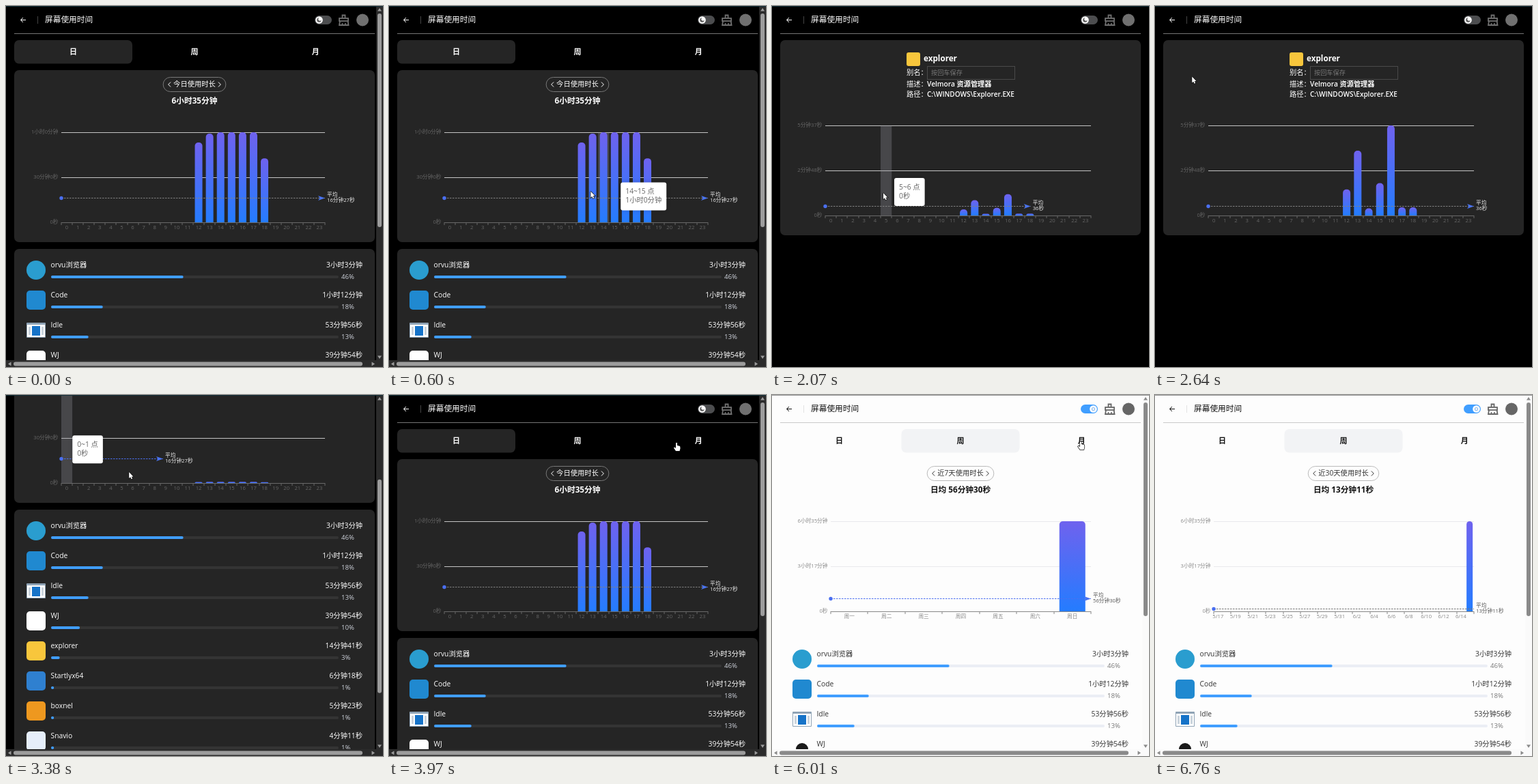
These frames come from a looping animation (552x529 px, 7010 ms). An HTML page with a canvas:

```html
<!DOCTYPE html>
<html lang="zh">
<head>
<meta charset="utf-8">
<title>屏幕使用时间</title>
<style>
html, body { margin: 0; width: 100%; height: 100%; overflow: hidden; background: #000; }
canvas { display: block; width: 552px; height: 529px; }
</style>
</head>
<body>
<canvas id="stage"></canvas>
<script>
const W = 552, H = 529, LOOP = 7010;
const FONT = '"Open Sans", "Noto Sans CJK SC", "Noto Sans CJK", sans-serif';
const canvas = document.getElementById('stage');
const dpr = window.devicePixelRatio || 1;
canvas.width = W * dpr;
canvas.height = H * dpr;
const c = canvas.getContext('2d');

const DARK = {
  page: '#000', card: '#252525', tab: '#252525', text: '#fff', name: '#fff', sub: '#cfd3dc',
  rule: '#747474', edge: '#12303a', pill: '#777', axis: '#686868', grid: '#c4c4c4', axisText: '#666',
  avg: '#808080', avgText: '#eee', track: '#343434', bar: '#2b2b2b', thumb: '#9c9c9c', icon: '#707070', sep: '#444'
};
const LIGHT = {
  page: '#fdfdfd', card: '#fdfdfd', tab: '#f2f3f5', text: '#111', name: '#333', sub: '#777',
  rule: '#c9c9c9', edge: '#999', pill: '#bbb', axis: '#888', grid: '#e9e9ec', axisText: '#888',
  avg: '#777', avgText: '#555', track: '#ebeef5', bar: '#fafafa', thumb: '#8a8a8a', icon: '#666', sep: '#e2e2e2'
};

const ROWS = [
  ['orvu浏览器', '3小时3分钟', 46], ['Code', '1小时12分钟', 18], ['Idle', '53分钟56秒', 13],
  ['WJ', '39分钟54秒', 10], ['explorer', '14分钟41秒', 3], ['Startlyx64', '6分钟18秒', 1],
  ['boxnel', '5分钟23秒', 1], ['Snavio', '4分钟11秒', 1]
];
const ICONS = ['#2a9dcf', '#2089d0', '', '#fff', '#f8c63c', '#2f80d0', '#ee981f', '#e6eefa'];

const hours = Array.from({ length: 24 }, (_, i) => String(i));
const fill = (n, from, list) => Array.from({ length: n }, (_, i) => list[i - from] || 0);
const days = Array.from({ length: 30 }, (_, i) => (i < 15 ? `5/${17 + i}` : `6/${i - 14}`));

const CHARTS = {
  day: { left: 81, top: 185, barW: 11, labels: hours, step: 1, avg: 36, avgText: '16分钟27秒',
    vals: fill(24, 12, [.886, .985, 1, 1, 1, 1, .711]), y: ['1小时0分钟', '30分钟0秒', '0秒'],
    pill: '今日使用时长', head: '6小时35分钟', tab: 0,
    tips: { 12: '53分钟3秒', 13: '59分钟6秒', 14: '1小时0分钟', 15: '1小时0分钟', 16: '1小时0分钟', 17: '1小时0分钟', 18: '42分钟46秒' } },
  app: { left: 78, top: 175, barW: 11, labels: hours, step: 1, avg: 14, avgText: '36秒',
    vals: fill(24, 12, [.29, .72, .08, .36, 1, .09, .09]), y: ['5分钟37秒', '2分钟48秒', '0秒'], tips: {} },
  week: { left: 86, top: 185, barW: 38, labels: [...'一二三四五六日'].map(d => '周' + d), step: 1, avg: 19,
    avgText: '56分钟30秒', vals: fill(7, 6, [1]), y: ['6小时35分钟', '3小时17分钟', '0秒'],
    pill: '近7天使用时长', head: '日均 56分钟30秒', tab: 1, tips: {}, blue: true },
  month: { left: 86, top: 185, barW: 9, labels: days, step: 2, avg: 4, avgText: '13分钟11秒',
    vals: fill(30, 29, [1]), y: ['6小时35分钟', '3小时17分钟', '0秒'],
    pill: '近30天使用时长', head: '日均 13分钟11秒', tab: 1, tips: {}, plain: true }
};

// time shown from, chart, time its growth starts
const VIEWS = [[0, 'day', -999], [1900, 'app', 1954], [3190, 'day', 3336], [4300, 'week', 4330], [6420, 'month', 6440]];
const GROW = 300, RIGHT = 467, PLOT = 132;

const SCROLL = [[0, 0], [960, 0], [1000, 62], [1090, 62], [1130, 125], [1180, 125], [1220, 188], [3540, 188], [3720, 0], [7010, 0]];
// time, x, y, hand
const MOUSE = [
  [60, 430, 519], [280, 385, 300], [620, 290, 270], [910, 229, 233], [960, 222, 250], [1000, 222, 267],
  [1250, 222, 267], [1480, 210, 372, 1], [1850, 200, 372], [1970, 163, 274], [2250, 163, 274],
  [2600, 60, 120], [2850, 25, 20, 1], [3190, 25, 20], [3280, 81, 81], [3330, 92, 95], [3380, 180, 113],
  [3560, 210, 125], [3720, 305, 238], [3780, 322, 221], [3830, 288, 185], [3960, 421, 70, 1],
  [3990, 421, 70, 1], [4150, 290, 68, 1], [4350, 290, 68], [4900, 400, 60], [5130, 462, 18, 1],
  [5320, 462, 18, 1], [5700, 452, 68, 1], [6050, 452, 68], [6400, 475, 200], [6745, 480, 531]
];

const clamp = v => Math.max(0, Math.min(1, v));
const cubicOut = p => 1 - (1 - p) ** 3;
const cubicInOut = p => (p < .5 ? 4 * p ** 3 : 1 - 4 * (1 - p) ** 3);

function at(keys, t) {
  let i = 0;
  while (i < keys.length - 2 && t >= keys[i + 1][0]) i++;
  const a = keys[i], b = keys[i + 1];
  const p = clamp((t - a[0]) / (b[0] - a[0]));
  return [a[1] + (b[1] - a[1]) * p, (a[2] || 0) + ((b[2] || 0) - (a[2] || 0)) * p, a[3]];
}
const viewAt = t => VIEWS.filter(v => v[0] <= t).pop();
const scrollAt = t => (viewAt(t)[1] === 'app' ? 0 : at(SCROLL, t)[0]);

function hoverAt(t) {
  if (t < 120) return -1;
  const k = CHARTS[viewAt(t)[1]];
  const [x, y] = at(MOUSE, t - 50);
  const top = k.top - scrollAt(t);
  if (x < k.left || x >= RIGHT || y < top || y > top + PLOT) return -1;
  return Math.floor((x - k.left) / (RIGHT - k.left) * k.labels.length);
}

function text(s, x, y, size, color, align = 'left', weight = 400) {
  c.font = `${weight} ${size}px ${FONT}`;
  c.textAlign = align;
  c.textBaseline = 'middle';
  c.fillStyle = color;
  c.fillText(s, x, y);
}
function box(x, y, w, h, r, color) {
  c.beginPath();
  c.roundRect(x, y, w, h, r);
  c.fillStyle = color;
  c.fill();
}
function disc(x, y, r, color) {
  c.beginPath();
  c.arc(x, y, r, 0, 7);
  c.fillStyle = color;
  c.fill();
}
function path(points, color, width = 1) {
  c.beginPath();
  points.forEach(([x, y]) => c.lineTo(x, y));
  c.strokeStyle = color;
  c.lineWidth = width;
  c.stroke();
}
function shape(points, color) {
  c.beginPath();
  points.forEach(([x, y]) => c.lineTo(x, y));
  c.closePath();
  c.fillStyle = color;
  c.fill();
}

function header(th) {
  const on = th === LIGHT;
  path([[29, 20.5], [21.5, 20.5]], th.text);
  path([[25, 17], [21.5, 20.5], [25, 24]], th.text);
  box(46, 15, 1, 11, 0, th.sep);
  text('屏幕使用时间', 57, 21, 11.7, th.text, 'left', 500);
  box(452, 14, 25, 13, 6.5, on ? '#409eff' : '#4c4d4f');
  const kx = on ? 470.5 : 458.5;
  disc(kx, 20.5, 5.3, '#fff');
  if (on) {
    disc(kx, 20.5, 2.6, '#8ab8e8');
    disc(kx, 20.5, 1.5, '#fff');
  } else {
    disc(kx, 20.5, 3.2, '#555');
    disc(kx + 1.3, 19.3, 2.5, '#fff');
  }
  c.strokeStyle = th.icon;
  c.lineWidth = 1.8;
  c.strokeRect(488, 18, 13, 4);
  path([[492.5, 18], [492.5, 13.5], [496.5, 13.5], [496.5, 18]], th.icon, 1.8);
  path([[489, 22], [488, 28], [501.5, 28], [500.5, 22]], th.icon, 1.8);
  path([[492.5, 28], [492.5, 25]], th.icon, 1.6);
  path([[496.8, 28], [496.8, 25]], th.icon, 1.6);
  disc(522, 20.5, 9, th.icon);
  box(12, 40, 528, 1, 0, th.rule);
}

function chart(k, th, t, start, scrolled) {
  const { left, top } = k, base = top + PLOT, n = k.labels.length;
  const cell = (RIGHT - left) / n;
  const p = clamp((t - start) / GROW);
  const rise = cubicInOut(p), end = left + (RIGHT - left) * cubicOut(p);

  k.y.forEach((s, i) => {
    const y = top + i * PLOT / 2;
    text(s, left - 4.5, y, 7.7, th.axisText, 'right');
    box(left, y, RIGHT - left, 1, 0, i === 2 ? th.axis : th.grid);
  });
  for (let i = 0; i <= n; i += k.step) box(Math.round(left + i * cell) - .5, base, 1, 4, 0, th.axis);
  for (let i = 0; i < n; i += k.step) text(k.labels[i], left + (i + .5) * cell, base + 8, 7.7, th.axisText, 'center');

  const hover = hoverAt(t);
  if (hover >= 0) box(left + hover * cell, top, cell, PLOT, 0, 'rgba(150,150,160,.3)');

  const mid = i => left + (i + .5) * cell;
  k.vals.forEach((v, i) => {
    const h = v * PLOT * rise;
    if (h < .3) return;
    const g = c.createLinearGradient(0, base - h, 0, base);
    g.addColorStop(0, '#6f62ee');
    g.addColorStop(1, '#247cff');
    const r = Math.min(5, k.barW / 2, h);
    box(mid(i) - k.barW / 2, base - h, k.barW, h, [r, r, 0, 0], g);
  });

  if (p <= 0) return;
  const y = base - k.avg + .5;
  c.setLineDash([2.5, 1.5]);
  path([[left, y], [end, y]], k.blue || scrolled ? '#4b6ff0' : th.avg);
  c.setLineDash([]);
  disc(left, y, 2.7, '#4a6ff0');
  if (!k.plain) shape([[end, y], [end - 10, y - 3.5], [end - 7.5, y], [end - 10, y + 3.5]], '#4a74f0');
  text('平均', end + 3, y - 4.5, 7.7, th.avgText);
  text(k.avgText, end + 3, y + 3, 7.7, th.avgText);
}

function icon(i, y, th) {
  if (i === 0) return disc(44, y, 14, ICONS[0]);
  if (i === 2) {
    box(30, y - 11, 28, 22, 1, '#8fa3b5');
    box(31, y - 8, 26, 18, 0, '#fff');
    box(38, y - 6, 12, 14, 0, '#1673c8');
    box(33, y - 5, 3, 12, 0, '#c9d3dc');
    return box(52, y - 5, 3, 12, 0, '#c9d3dc');
  }
  if (i === 3 && th === LIGHT) return disc(44, y, 9, '#1a1a1a');
  box(30, y - 14, 28, 28, 5, ICONS[i]);
}

function list(th) {
  box(12, 356, 528, 480, 7, th.card);
  ROWS.forEach(([name, time, pct], i) => {
    const y = 380 + 44 * i;
    icon(i, y + 7, th);
    text(name, 65.5, y + .5, 10.3, th.name, 'left', 500);
    text(time, 522, y + .5, 10.3, th.name, 'right', 500);
    box(66, y + 15, 421, 4, 2, th.track);
    box(66, y + 15, Math.max(4, 4.21 * pct), 4, 2, '#409eff');
    text(pct + '%', 491, y + 17.5, 9.6, th.sub);
  });
}

function overview(k, th, t, start) {
  const s = scrollAt(t);
  c.save();
  c.beginPath();
  c.rect(0, 0, 542, 519);
  c.clip();
  c.translate(0, -s);
  header(th);
  box([12, 189.5, 367][k.tab], 50, 173, 34.5, 7, th.tab);
  ['日', '周', '月'].forEach((d, i) => text(d, 98.5 + 177.4 * i, 68, 11, th.text, 'center', 700));
  box(12, 94, 528, 252, 7, th.card);
  c.font = `400 10.3px ${FONT}`;
  const half = c.measureText(k.pill).width / 2;
  c.beginPath();
  c.roundRect(276 - half - 15, 104.5, half * 2 + 30, 21, 10.5);
  c.strokeStyle = th.pill;
  c.lineWidth = 1;
  c.stroke();
  for (const d of [-1, 1]) {
    const x = 276 + d * (half + 6);
    path([[x - d * 2, 111.5], [x + d * 1.5, 115], [x - d * 2, 118.5]], th.name);
  }
  text(k.pill, 276, 115, 10.3, th.name, 'center');
  text(k.head, 276, 140, 11.7, th.text, 'center', 700);
  chart(k, th, t, start, s > 0);
  list(th);
  c.restore();
  bars(th, s);
}

function bars(th, s) {
  box(542, 0, 10, H, 0, th.bar);
  box(0, 519, W, 10, 0, th.bar);
  box(544, 11 + s * .6, 6, 313, 3, th.thumb);
  box(11, 521.5, 511, 6, 3, th.thumb);
  shape([[547, 3], [550, 7.5], [544, 7.5]], th.thumb);
  shape([[547, 517], [550, 512.5], [544, 512.5]], th.thumb);
  shape([[3, 524.5], [7.5, 521.5], [7.5, 527.5]], th.thumb);
  shape([[540, 524.5], [535.5, 521.5], [535.5, 527.5]], th.thumb);
}

function detail(k, th, t, start) {
  header(th);
  box(12, 50, 528, 286, 7, th.card);
  box(197, 68, 20, 20, 3, ICONS[4]);
  text('explorer', 222, 77.5, 11.7, th.text, 'left', 700);
  ['别名：', '描述：', '路径：'].forEach((s, i) => text(s, 197, [98, 115.5, 130.5][i], 10.3, th.name));
  c.strokeStyle = '#4a4a4a';
  c.lineWidth = 1;
  c.strokeRect(227.5, 88.5, 128, 19);
  text('按回车保存', 233, 98.5, 9.2, '#777');
  text('Velmora 资源管理器', 227, 115.5, 10.2, th.name, 'left', 600);
  text('C:\\WINDOWS\\Explorer.EXE', 227, 130.5, 10, th.name, 'left', 600);
  chart(k, th, t, start, false);
}

function tooltip(t) {
  let last = t, cell = hoverAt(t);
  while (cell < 0 && t - last < 80) cell = hoverAt(last -= 5);
  if (cell < 0 || viewAt(last) !== viewAt(t)) return;
  const [mx, my] = at(MOUSE, last - 100);
  const value = CHARTS[viewAt(last)[1]].tips[cell] || '0秒';
  const title = `${cell}~${cell + 1} 点`;
  c.font = `400 10.3px ${FONT}`;
  const w = Math.max(c.measureText(title).width, c.measureText(value).width) + 14;
  const x = mx + 16, y = my - 22;
  c.save();
  c.globalAlpha = last === t ? 1 : clamp(1 - (t - last) / 85);
  c.shadowColor = 'rgba(0,0,0,.2)';
  c.shadowBlur = 6;
  box(x, y, w, 41, 3, '#fff');
  c.shadowBlur = 0;
  text(title, x + 7, y + 14, 10.3, '#666');
  text(value, x + 7, y + 27, 10.3, '#666');
  c.restore();
}

const ARROW = [[0, 0], [0, 9], [2, 7.2], [3.4, 10.2], [4.9, 9.5], [3.6, 6.6], [6.2, 6.4]];
const HAND = [[-.8, 0], [.8, 0], [1, 4], [5, 5], [5.5, 8], [4.5, 12], [-1, 12], [-4, 7.5], [-3, 6.5], [-1, 8]];
function pointer(t) {
  if (t < 60 || t > 6745) return;
  const [x, y, hand] = at(MOUSE, t);
  const points = hand ? HAND : ARROW;
  c.save();
  c.translate(x, y);
  path([...points, points[0]], '#111', 1.4);
  shape(points, '#fff');
  c.restore();
}

function scene(th, t) {
  const [, name, start] = viewAt(t);
  box(0, 0, W, H, 0, th.page);
  (name === 'app' ? detail : overview)(CHARTS[name], th, t, start);
  box(0, 0, W, 1, 0, th.edge);
}

function render(t) {
  c.setTransform(dpr, 0, 0, dpr, 0, 0);
  const spread = clamp((t - 5215) / 105);
  if (spread < 1) scene(DARK, t);
  if (spread > 0) {
    c.save();
    c.beginPath();
    c.arc(464, 20, spread * 700, 0, 7);
    c.clip();
    scene(LIGHT, t);
    c.restore();
  }
  tooltip(t);
  pointer(t);
}

const begin = performance.now();
function tick() {
  render((performance.now() - begin) % LOOP);
  requestAnimationFrame(tick);
}
tick();
</script>
</body>
</html>
```
